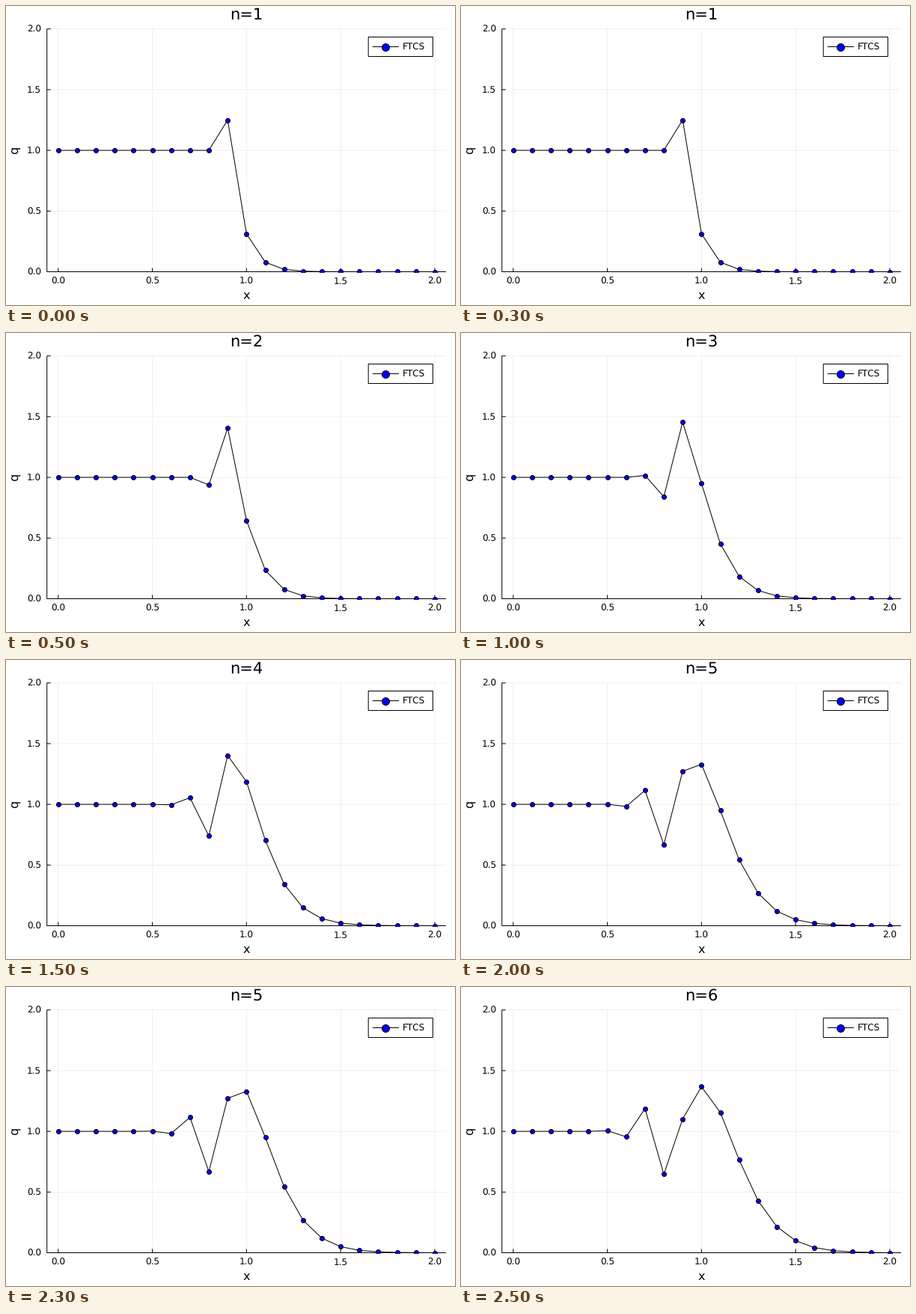
Recreate the animation shown at these times as a matplotlib script. Size 600x400 px, loop 3000 ms.

```python
import matplotlib.pyplot as plt
import numpy as np
from matplotlib.animation import FuncAnimation
from matplotlib.patches import Rectangle

W, H, DPI = 600, 400, 100
PT = 72 / DPI                       # points per pixel
LEFT, RIGHT, TOP, BOTTOM = 54.7, 588, 30.7, 355.5
STEPS = 6
COURANT = 0.5

plt.rcParams.update({"font.family": "DejaVu Sans", "path.snap": False,
                     "text.hinting": "none", "text.hinting_factor": 1})


def px(x):
    return LEFT + (x + 0.06) / 2.12 * (RIGHT - LEFT)


def py(q):
    return BOTTOM - q / 2 * (BOTTOM - TOP)


def solve():
    """In-place FTCS advection of a step, with fixed end points."""
    q = np.where(np.arange(21) < 10, 1.0, 0.0)
    states = []
    for _ in range(STEPS):
        for j in range(1, len(q) - 1):
            q[j] -= COURANT / 2 * (q[j + 1] - q[j - 1])
        states.append(q.copy())
    return states


fig = plt.figure(figsize=(W / DPI, H / DPI), dpi=DPI, facecolor="white")
ax = fig.add_axes([0, 0, 1, 1])
ax.set_xlim(0, W)
ax.set_ylim(H, 0)
ax.axis("off")


def line(xs, ys, color="black", width=1.0, **kw):
    return ax.plot(xs, ys, color=color, lw=width * PT,
                   solid_capstyle="butt", **kw)[0]


def label(x, y, text, size=11.65, ha="center", **kw):
    return ax.text(x, y, text, fontsize=size * PT, ha=ha,
                   va="baseline", color="black", **kw)


def dots(xs, ys, diameter, **kw):
    return ax.scatter(xs, ys, s=(diameter * PT) ** 2, c="#0000ff",
                      edgecolors="black", linewidths=PT, **kw)


# Grid, ticks and tick labels
for v in np.arange(0, 2.01, 0.5):
    x, y = px(v), py(v)
    line([x, x], [TOP, BOTTOM], "#e6e6e6", 0.6, zorder=1)
    line([LEFT, RIGHT], [y, y], "#e6e6e6", 0.6, zorder=1)
    line([x, x], [BOTTOM, BOTTOM - 5], zorder=2)
    line([LEFT, LEFT + 5], [y, y], zorder=2)
    label(x, 371.5, f"{v:.1f}")
    label(47, y + 4.3, f"{v:.1f}", ha="right")

line([LEFT, LEFT], [TOP, BOTTOM], zorder=2)
line([LEFT, RIGHT], [BOTTOM, BOTTOM], zorder=2)

mid_x, mid_y = (LEFT + RIGHT) / 2, (TOP + BOTTOM) / 2
label(mid_x, 391.5, "x", 16)
label(17, mid_y, "q", 16, rotation=90, rotation_mode="anchor")
title = label(mid_x, 18, "", 20.6)

# Curve and markers, clipped to the plot area
grid_x = px(np.linspace(0, 2, 21))
states = solve()
curve = line(grid_x, py(states[0]), zorder=3)
points = dots(grid_x, py(states[0]), 6, zorder=4)
clip = Rectangle((LEFT, TOP), RIGHT - LEFT, BOTTOM + 0.5 - TOP,
                 transform=ax.transData)
for artist in (curve, points):
    artist.set_clip_path(clip)

# Legend
ax.add_patch(Rectangle((484.2, 41.5), 86.2, 26, fc="white", ec="black",
                       lw=PT, zorder=5))
line([489.8, 525], [54.5, 54.5], zorder=6)
dots([507.3], [54.5], 10, zorder=7)
label(530, 59, "FTCS", ha="left", zorder=7)


def draw(i):
    y = py(states[i])
    curve.set_ydata(y)
    points.set_offsets(np.column_stack([grid_x, y]))
    title.set_text(f"n={i + 1}")
    return curve, points, title


anim = FuncAnimation(fig, draw, frames=STEPS, interval=500,
                     repeat=True, repeat_delay=0)
plt.show()
```
